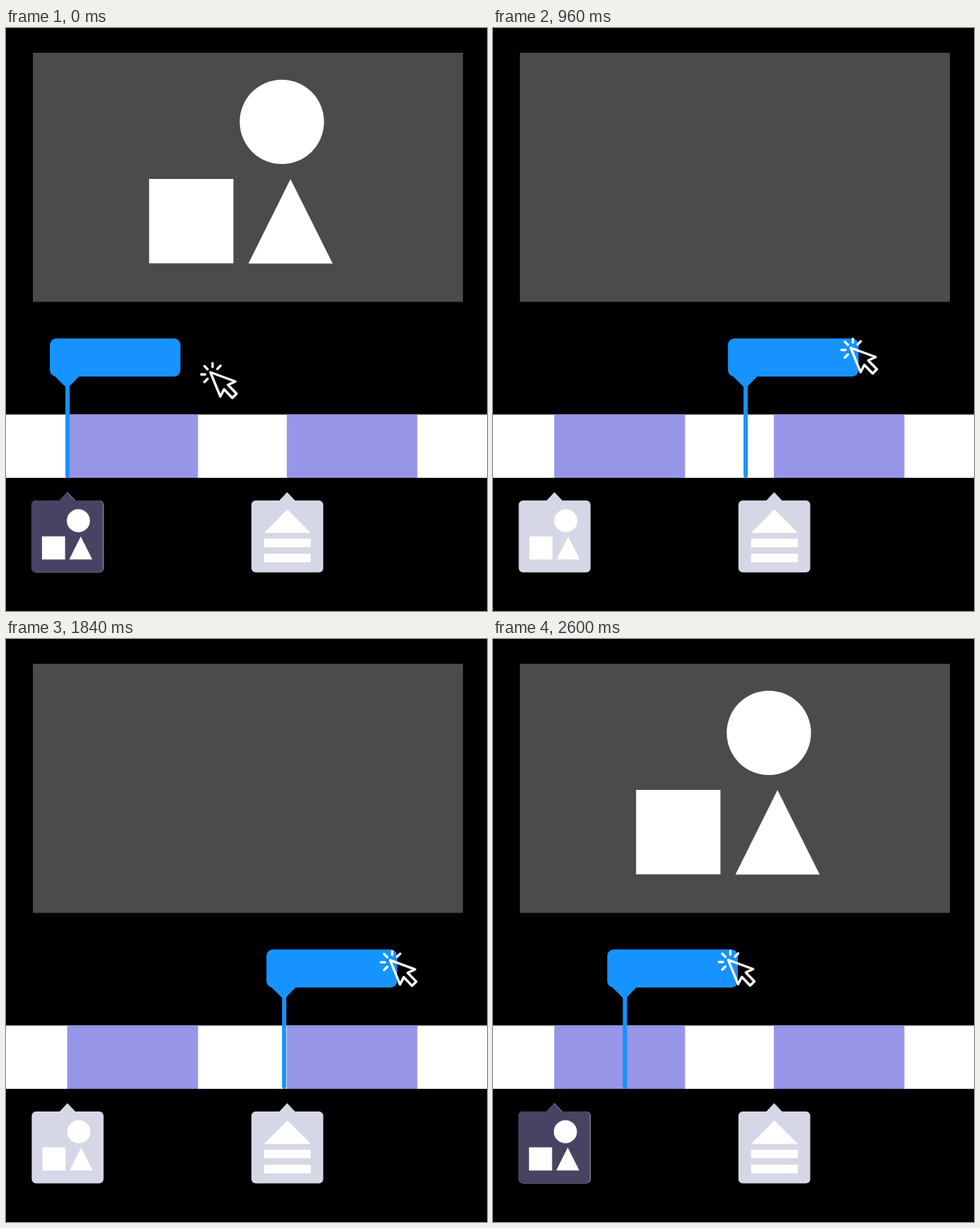
An HTML page with a canvas that plays this animation: 680x823 px, repeating every 2.92 s.

```html
<!DOCTYPE html>
<html lang="en">
<head>
<meta charset="utf-8">
<title>Timeline scrubbing</title>
<style>
html, body { margin: 0; width: 100%; height: 100%; overflow: hidden; background: #000; }
canvas { display: block; }
</style>
</head>
<body>
<canvas id="stage" width="680" height="823"></canvas>
<script>
const ctx = document.getElementById('stage').getContext('2d');
const LOOP = 2920, STEP = 40;
const WHITE = '#fff', BLUE = '#1693ff', LIGHT = '#d6d7e6', DARK = '#4a4262';

const rect = (color, x, y, w, h) => {
  ctx.fillStyle = color;
  ctx.fillRect(x, y, w, h);
};
const roundRect = (color, x, y, w, h, r) => {
  ctx.fillStyle = color;
  ctx.beginPath();
  ctx.roundRect(x, y, w, h, r);
  ctx.fill();
};
const polygon = (color, ...points) => {
  ctx.fillStyle = color;
  ctx.beginPath();
  points.forEach(p => ctx.lineTo(...p));
  ctx.fill();
};
const at = (x, y, draw) => {
  ctx.save();
  ctx.translate(x, y);
  draw();
  ctx.restore();
};
const lerp = (a, b, u) => a + (b - a) * u;
const progress = (t, start, end) => Math.min(1, Math.max(0, (t - start) / (end - start)));

// Both icons are drawn in the coordinates of the preview panel.
function shapes() {
  ctx.fillStyle = WHITE;
  ctx.beginPath();
  ctx.arc(390, 132.5, 59.6, 0, 7);
  ctx.fill();
  rect(WHITE, 202.3, 213, 119.2, 119.2);
  polygon(WHITE, [402.2, 213.3], [461.8, 332.4], [342.7, 332.4]);
}
function eject() {
  polygon(WHITE, [330, 94.5], [427, 193], [233, 193]);
  rect(WHITE, 233, 217, 194, 35.4);
  rect(WHITE, 233, 279.5, 194, 35.5);
}

function card(color) {
  roundRect(color, 0, 12, 101.5, 101.5, 6);
  polygon(color, [38.5, 13], [50.5, 0.3], [62.5, 13]);
}
function thumbnail(x, active, dx, dy, icon) {
  at(x, 655, () => card(LIGHT));
  if (active) at(x + dx, 655 + dy, () => card(DARK));
  at(active ? dx : 0, active ? dy : 0, icon);
}
function scaled(x, y, scale, draw) {
  at(x, y, () => {
    ctx.scale(scale, scale);
    draw();
  });
}

function playhead(x) {
  at(x, 0, () => {
    roundRect(BLUE, -25, 438.3, 184.6, 53.7, 9);
    polygon(BLUE, [-20, 489.5], [18.5, 489.5], [0, 508.5], [-2, 507.5]);
    roundRect(BLUE, -3, 500, 6, 135, 3);
  });
}

const pointer = new Path2D(
  'M289 486L324.3 499L313.8 503.8L326 516.3L320 522.2L308.3 510L303 520.3Z' +
  'M292 473.2V478.6M276 489H281.6M298.8 481.2L303.2 476.8' +
  'M280.6 477.3L285 481.7M280.6 499.7L285 495.3');

function cursor(x, y) {
  at(x, y, () => {
    ctx.strokeStyle = WHITE;
    ctx.lineWidth = 3.4;
    ctx.lineCap = ctx.lineJoin = 'round';
    ctx.stroke(pointer);
  });
}

function pose(t) {
  const approach = progress(t, 0, 320);
  const drag = progress(t, 320, 1200);
  const back = progress(t, 1600, 2600);
  if (back > 0) return [lerp(458.5, 186.5, back), lerp(320.5, 43.5, back), lerp(-32.5, -33, back)];
  if (drag > 0) return [lerp(87, 458.5, drag), lerp(-60, 320.5, drag), -34.2 - 6 * drag + 7.7 * drag * drag];
  return [87, -60 * approach, -34.2 * approach];
}

function draw(t) {
  const [headX, cursorX, cursorY] = pose(t);
  const first = headX < 273;
  const second = headX > 396;

  rect('#000', 0, 0, 680, 823);
  rect('#4b4b4b', 38, 35, 608, 351.6);
  if (first) shapes();
  if (second) eject();

  rect(WHITE, 0, 545.6, 680, 89.4);
  rect('#9795e8', 86.5, 545.6, 185, 89.4);
  rect('#9795e8', 397, 545.6, 184.6, 89.4);

  thumbnail(36.4, first, -0.6, 0, () => scaled(-4, 659.2, 0.2742, shapes));
  thumbnail(347, second, 0, -0.5, () => scaled(285.8, 647.3, 0.3395, eject));

  playhead(headX);
  cursor(cursorX, cursorY);
}

function frame() {
  const t = performance.now() % LOOP;
  draw(Math.floor(t / STEP) * STEP);
  requestAnimationFrame(frame);
}
frame();
</script>
</body>
</html>
```
